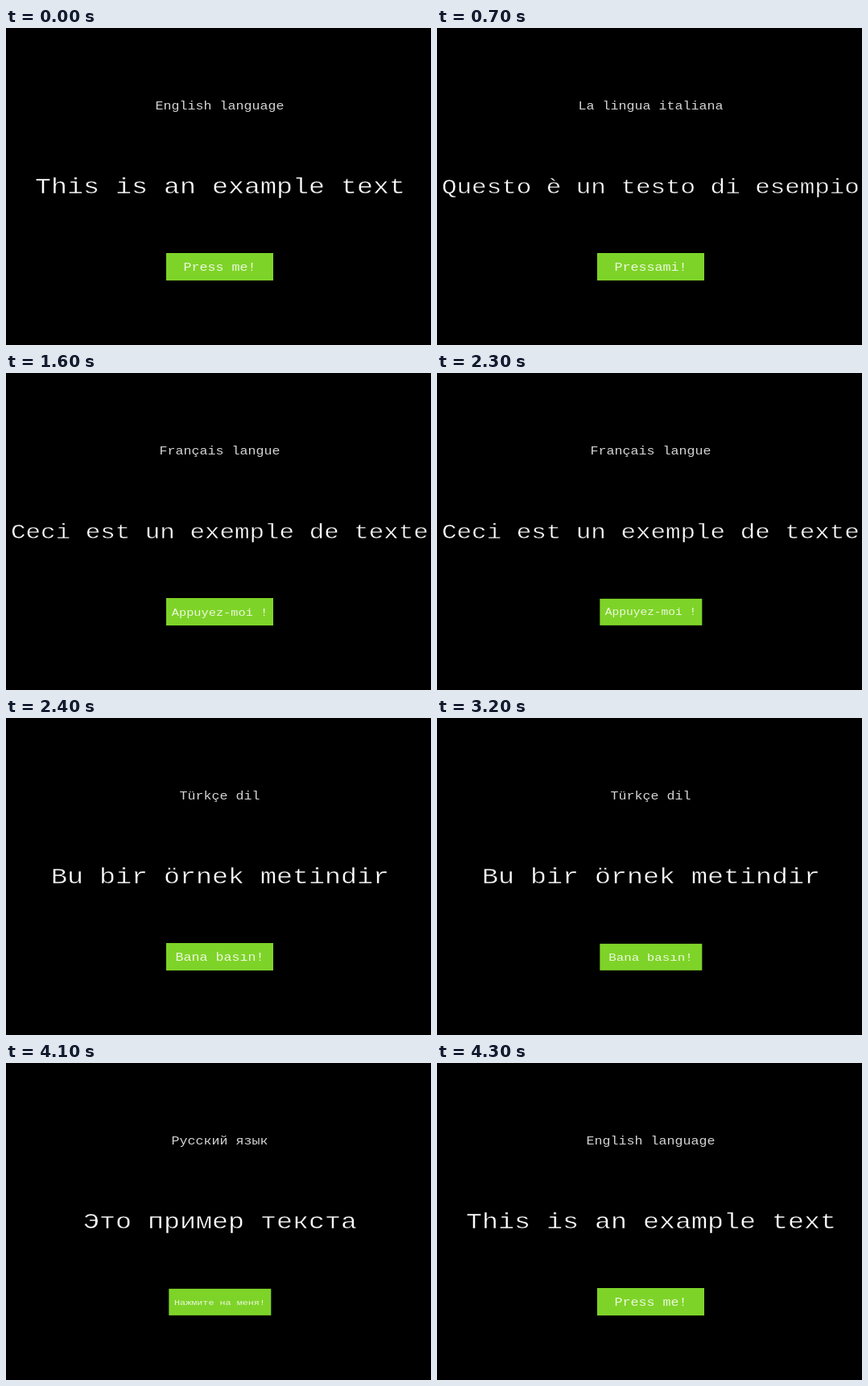
An HTML page that plays this animation: 528x393 px, repeating every 5.4 s.

```html
<!DOCTYPE html>
<html lang="en">
<head>
<meta charset="utf-8">
<title>Language switcher</title>
<style>
  html, body { margin: 0; width: 100%; height: 100%; overflow: hidden; background: #000; }
  svg { display: block; width: 528px; height: 393px; }
  /* Flattened about the baseline for low, wide typewriter letters */
  text {
    font-family: "Courier New", "Liberation Mono", monospace;
    font-size: 16.67px;
    text-anchor: middle;
    white-space: pre;
    fill: #fff;
    transform: scaleY(.84);
  }
  .caption { fill: #d4d4d4; transform-origin: 0 101px; }
  /* A black outline thins the large strokes */
  .headline { font-size: 33.33px; stroke: #000; stroke-width: .5px; transform-origin: 0 205px; }
  .wide { font-size: 30.9px; }
  .button rect { fill: #7ed328; shape-rendering: crispEdges; }
  .button text { fill: #ecf8dd; transform-origin: 0 301px; }

  .scene, .button { animation: 5400ms step-end infinite; }
  .button { transform-origin: 265.5px 296px; animation-name: press; }
  .en { animation-name: en; }
  .it { animation-name: it; }
  .fr { animation-name: fr; }
  .tr { animation-name: tr; }
  .ru { animation-name: ru; }

  @keyframes en { 0%, 79.62%, 100% { visibility: visible } 12.96% { visibility: hidden } }
  @keyframes it { 0%, 29.62%, 100% { visibility: hidden } 12.96% { visibility: visible } }
  @keyframes fr { 0%, 44.44%, 100% { visibility: hidden } 29.62% { visibility: visible } }
  @keyframes tr { 0%, 61.11%, 100% { visibility: hidden } 44.44% { visibility: visible } }
  @keyframes ru { 0%, 79.62%, 100% { visibility: hidden } 61.11% { visibility: visible } }

  /* Held down just before each language change */
  @keyframes press {
    0%, 12.96%, 29.62%, 44.44%, 61.11%, 79.62%, 100% { transform: scale(1) }
    11.11%, 27.77%, 42.59%, 59.25%, 75.92% { transform: scale(.95) }
  }
</style>
</head>
<body>
<svg viewBox="0 0 528 393">
  <g class="scene en">
    <text class="caption" x="265.5" y="101">English language</text>
    <text class="headline" x="266" y="205">This is an example text</text>
  </g>
  <g class="scene it">
    <text class="caption" x="265.5" y="101">La lingua italiana</text>
    <text class="headline wide" x="265.5" y="205">Questo è un testo di esempio</text>
  </g>
  <g class="scene fr">
    <text class="caption" x="265.5" y="101">Français langue</text>
    <text class="headline wide" x="265.5" y="205">Ceci est un exemple de texte</text>
  </g>
  <g class="scene tr">
    <text class="caption" x="265.5" y="101">Türkçe dil</text>
    <text class="headline" x="266" y="205">Bu bir örnek metindir</text>
  </g>
  <g class="scene ru">
    <text class="caption" x="265.5" y="101">Русский язык</text>
    <text class="headline" x="266" y="205">Это пример текста</text>
  </g>

  <g class="button">
    <rect x="199" y="279" width="133" height="34"/>
    <text class="scene en" x="265.5" y="301">Press me!</text>
    <text class="scene it" x="265.5" y="301">Pressami!</text>
    <text class="scene fr" x="265.5" y="300.5" style="font-size: 15.33px">Appuyez-moi !</text>
    <text class="scene tr" x="265.5" y="301">Bana basın!</text>
    <text class="scene ru" x="265.5" y="299.5" style="font-size: 12.4px">Нажмите на меня!</text>
  </g>
</svg>
</body>
</html>
```
